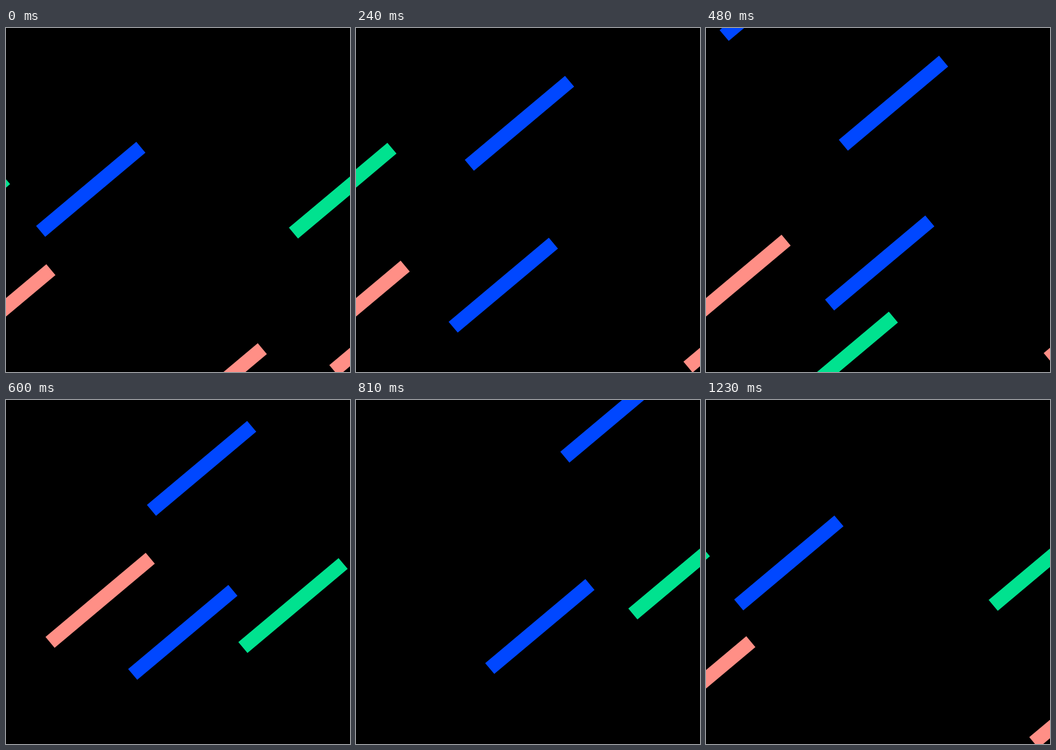
Write an HTML page with a canvas that moves like this. It is 600x600 px and loops after 1.26 s.

```html
<!DOCTYPE html>
<html lang="en">
<head>
<meta charset="utf-8">
<title>Streaks</title>
<style>
  html, body { margin: 0; width: 100%; height: 100%; overflow: hidden; background: #000; }
  canvas { display: block; }
</style>
</head>
<body>
<canvas id="stage" width="600" height="600"></canvas>
<script>
const SIZE = 600, LOOP = 1260, STEP = 30;
const CYCLE = 37000 / 30;          // period of the motion itself
const ANGLE = 40 * Math.PI / 180;
const LENGTH = 228.2, WIDTH = 24.7;
const SIN = Math.sin(ANGLE), COS = Math.cos(ANGLE);
const BLUE = '#0047ff', GREEN = '#00e28f', PINK = '#ff8f86';
const NEVER = { at: 2000, fade: 100 };

// Each bar rushes in, lingers near x = rest and rushes out again.
// lane: distance of its diagonal from the top left corner.
// at: when the rush is 100 px away from rest; fade: its time constant in ms.
const bars = [
  { color: BLUE,  lane: 310.6, rest: 429, enter: { at: 129, fade: 195 }, leave: { at: 800, fade: 81 } },
  { color: BLUE,  lane: 508.7, rest: 396, enter: { at: 165, fade: 114 }, leave: { at: 1048, fade: 114 } },
  { color: BLUE,  lane: 30.4,  rest: 450, enter: { at: 658, fade: 200 }, leave: NEVER },
  { color: GREEN, lane: 200.9, rest: -11, enter: { at: -600, fade: 100 }, leave: { at: 277.5, fade: 123 } },
  { color: GREEN, lane: 596.4, rest: 663, enter: { at: 577, fade: 80 }, leave: { at: 1428.5, fade: 96.5 } },
  { color: PINK,  lane: 373.2, rest: 78,  enter: { at: -249, fade: 50 }, leave: { at: 536, fade: 116 } },
  { color: PINK,  lane: 715.8, rest: 1010, enter: { at: 345.6, fade: 200 }, leave: NEVER, from: 0 },
  { color: PINK,  lane: 825.3, rest: 743, enter: { at: -245, fade: 45 }, leave: { at: 788, fade: 247 } }
];

const rush = (dt, fade) => 100 * Math.exp(dt / fade);

function headAt({ rest, enter, leave }, t) {
  return rest - rush(enter.at - t, enter.fade) + rush(t - leave.at, leave.fade);
}

const ctx = document.getElementById('stage').getContext('2d');

function drawBar(bar, t) {
  const x = headAt(bar, t);
  if (t < bar.from || x < -WIDTH || x > SIZE + LENGTH) return;
  ctx.save();
  ctx.translate(x, (bar.lane - x * SIN) / COS);
  ctx.rotate(-ANGLE);
  ctx.fillStyle = bar.color;
  ctx.fillRect(-LENGTH, -WIDTH / 2, LENGTH, WIDTH);
  ctx.restore();
}

function draw(t) {
  ctx.fillStyle = '#000';
  ctx.fillRect(0, 0, SIZE, SIZE);
  for (const bar of bars) {
    for (const shift of [-CYCLE, 0, CYCLE]) drawBar(bar, t + shift);
  }
}

const start = performance.now();
function tick() {
  const t = (performance.now() - start) % LOOP;
  draw(Math.floor(t / STEP) * STEP);
  requestAnimationFrame(tick);
}
tick();
</script>
</body>
</html>
```
